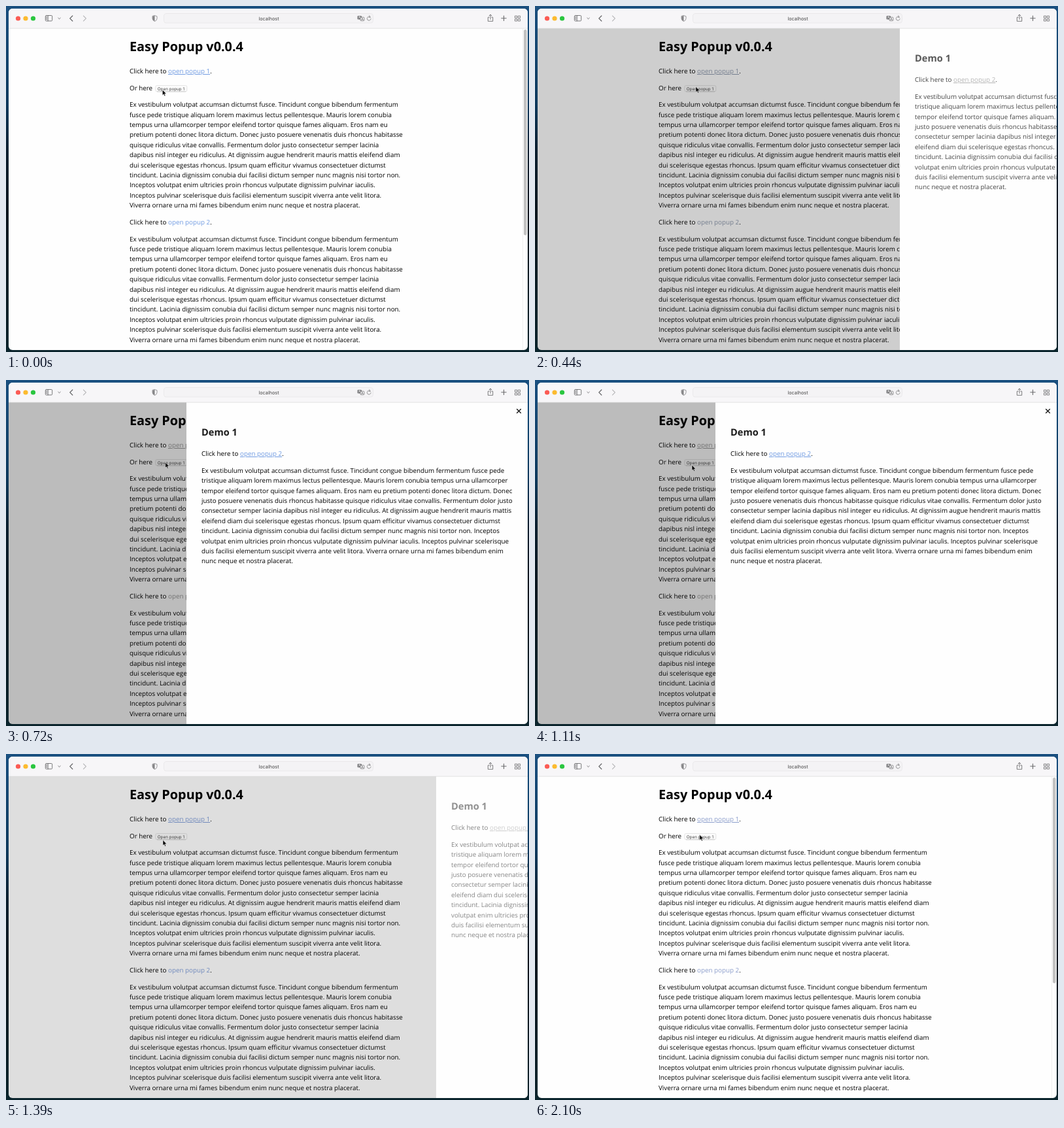
An HTML page that plays this animation: 800x529 px, repeating every 2.21 s.

```html
<!DOCTYPE html>
<html lang="en">
<head>
<meta charset="utf-8">
<title>Easy Popup</title>
<style>
  html, body { margin: 0; width: 100%; height: 100%; overflow: hidden; background: #0a1f29; }
  svg { display: block; width: 800px; height: 529px; }
  text { font: 9.83px "Open Sans", "Noto Sans", sans-serif; fill: #000; text-rendering: geometricPrecision; }
  .title { font-size: 19.84px; font-weight: 700; }
  .subtitle { font-size: 14.6px; font-weight: 700; fill: #1c1c1c; }
  .ui { font-family: Inter, "Liberation Sans", sans-serif; fill: #444; }
  .under { text-decoration: underline; text-decoration-thickness: .6px; text-underline-offset: 1px; }
  .icon { fill: none; stroke: #6a6a6c; stroke-width: .9; stroke-linecap: round; stroke-linejoin: round; }
</style>
</head>
<body>
<svg viewBox="0 0 800 529">
  <defs>
    <linearGradient id="sky" x2="0" y2="1">
      <stop offset="0" stop-color="#1a5080"/>
      <stop offset=".28" stop-color="#0e3a5e"/>
      <stop offset=".42" stop-color="#0a2030"/>
      <stop offset=".6" stop-color="#08161e"/>
      <stop offset="1" stop-color="#0b252d"/>
    </linearGradient>
    <clipPath id="frame"><rect x="4" y="4" width="794" height="522" rx="6"/></clipPath>
    <clipPath id="view"><rect x="4" y="34" width="794" height="492"/></clipPath>
  </defs>
  <rect width="800" height="529" fill="url(#sky)"/>

  <g clip-path="url(#frame)">
    <rect x="4" y="4" width="794" height="522" fill="#fefefe"/>

    <!-- Page -->
    <g id="page">
      <text class="title" x="189" y="69">Easy Popup v0.0.4</text>
      <text x="189" y="103">Click here to <tspan class="link under">open popup 1</tspan>.</text>
      <text x="189" y="128.7">Or here</text>
      <rect x="228.8" y="121.6" width="48" height="9.2" rx="2" fill="#fcfcfc" stroke="#d4d4d4" stroke-width=".6"/>
      <path d="M231 130.9H275" stroke="#bbb" stroke-width=".7"/>
      <text class="ui" x="231.8" y="128.5" style="font-size:6.3px">Open popup 1</text>
      <text x="189" y="334">Click here to <tspan class="link">open popup 2</tspan>.</text>
    </g>
    <g id="scrollbar">
      <path d="M790.5 35V526" stroke="#ececec" stroke-width=".8"/>
      <rect x="792" y="36" width="4.6" height="314.5" rx="2.3" fill="#c2c2c2"/>
    </g>
    <rect id="shade" x="4" y="34" width="794" height="492"/>
    <path id="gutter" d="M789.7 35V526" stroke="#fff" stroke-width="1.2" opacity=".7"/>

    <!-- Popup -->
    <g clip-path="url(#view)">
      <g id="panel">
        <rect x="276" y="34" width="524" height="492" fill="#fefefe"/>
        <g id="content">
          <text class="subtitle" x="299" y="85">Demo 1</text>
          <text x="299" y="116">Click here to <tspan id="panelLink" class="under">open popup 2</tspan>.</text>
          <path d="M781.2 44.2l6.6 6.6m0-6.6l-6.6 6.6" stroke="#111" stroke-width="1.3"/>
        </g>
      </g>
    </g>

    <!-- Toolbar -->
    <rect x="4" y="4" width="794" height="30" fill="#f7f6f8"/>
    <path d="M4 34.2H798" stroke="#dedede" stroke-width=".8"/>
    <circle cx="18.5" cy="19" r="3.6" fill="#fb5b54"/>
    <circle cx="30" cy="19" r="3.6" fill="#fcbb2f"/>
    <circle cx="41.5" cy="19" r="3.6" fill="#2ac63f"/>
    <rect x="241.5" y="11.5" width="320" height="14.5" rx="3.5" fill="#f4f3f5" stroke="#e5e4e6" stroke-width=".7"/>
    <text class="ui" x="402" y="21.6" text-anchor="middle" style="font-size:7.3px">localhost</text>
    <g class="icon">
      <rect x="60.3" y="14.5" width="10.4" height="8.4" rx="1.4"/>
      <path d="M64.2 14.5v8.4M61.6 16.7h1.2M61.6 18.6h1.2M61.6 20.5h1.2"/>
      <path d="M79.8 18.2l1.7 1.6 1.7-1.6"/>
      <path d="M101.8 15l-4 4 4 4" stroke-width="1.2"/>
      <path d="M118.4 15l4 4-4 4" stroke="#bcbcbe" stroke-width="1.1"/>
      <path d="M227.5 14.6l3.5 1.2v3.4q0 2.8-3.5 4.3-3.5-1.5-3.5-4.3v-3.4z" stroke="#858587" stroke-width=".8"/>
      <path d="M227.5 14.8v8.4q-3.3-1.5-3.3-4v-3.3z" fill="#858587" stroke="none"/>
      <rect x="537.6" y="15" width="6.4" height="5.4" rx="1.2" fill="#77777a" stroke="none"/>
      <path d="M539.2 16.7h3M540.7 16v1M539.5 19l2.3-2.2" stroke="#fff" stroke-width=".6"/>
      <rect x="542" y="17.2" width="6" height="5.4" rx="1.2" fill="#f4f3f5" stroke-width=".7"/>
      <path d="M543.6 21.4l1.4-3 1.4 3M544.2 20.5h1.7" stroke-width=".6"/>
      <path d="M557.7 17.7a2.9 2.9 0 1 0 .4 2M555.5 14.6l1.6 1.6-1.7 1.4" stroke-width=".7"/>
      <path d="M739 17.3h-1.7v6h7.4v-6H743M741 20.3v-7M739 15l2-2 2 2"/>
      <path d="M757.8 18.8h7.4M761.5 15.1v7.4" stroke-width="1.1"/>
      <path d="M778.8 15.2h3v3h-3zM783.6 15.2h3v3h-3zM778.8 20h3v3h-3zM783.6 20h3v3h-3z" stroke-width=".8"/>
    </g>
  </g>

  <path id="cursor" d="M0 0V8.4l1.9-1.7 1.3 3 1.4-.6-1.3-2.9h2.6z" fill="#050505" stroke="#fff" stroke-width=".5"/>
</svg>

<script>
const LOOP = 2210, SLIDE = 522, CLOSE = 1225;
const $ = id => document.getElementById(id);
const links = document.querySelectorAll('.link');
const words = `Ex vestibulum volutpat accumsan dictumst fusce. Tincidunt congue bibendum fermentum
fusce pede tristique aliquam lorem maximus lectus pellentesque. Mauris lorem conubia
tempus urna ullamcorper tempor eleifend tortor quisque fames aliquam. Eros nam eu
pretium potenti donec litora dictum. Donec justo posuere venenatis duis rhoncus habitasse
quisque ridiculus vitae convallis. Fermentum dolor justo consectetur semper lacinia
dapibus nisl integer eu ridiculus. At dignissim augue hendrerit mauris mattis eleifend diam
dui scelerisque egestas rhoncus. Ipsum quam efficitur vivamus consectetuer dictumst
tincidunt. Lacinia dignissim conubia dui facilisi dictum semper nunc magnis nisi tortor non.
Inceptos volutpat enim ultricies proin rhoncus vulputate dignissim pulvinar iaculis.
Inceptos pulvinar scelerisque duis facilisi elementum suscipit viverra ante velit litora.
Viverra ornare urna mi fames bibendum enim nunc neque et nostra placerat.`.split(/\s+/);

// Words per line at the two column widths
const pageWrap = [10, 11, 12, 12, 10, 13, 10, 13, 10, 11, 12];
const panelWrap = [12, 12, 15, 13, 14, 12, 14, 12, 15, 5];

function paragraph(parent, x, y, wrap) {
  let start = 0;
  wrap.forEach((count, row) => {
    const line = document.createElementNS('http://www.w3.org/2000/svg', 'text');
    line.setAttribute('x', x);
    line.setAttribute('y', y + row * 15.4);
    line.textContent = words.slice(start, start += count).join(' ');
    parent.append(line);
  });
}
paragraph($('page'), 189, 154.2, pageWrap);
paragraph($('page'), 189, 359.6, pageWrap);
paragraph($('content'), 299, 141.8, panelWrap);

const clamp = v => Math.min(1, Math.max(0, v));
const mix = (a, b, k) => a + (b - a) * k;
const mixColor = (a, b, k) => `rgb(${a.map((v, i) => mix(v, b[i], k))})`;

// CSS "ease": cubic-bezier(.25, .1, .25, 1)
function ease(x) {
  let lo = 0, hi = 1;
  for (let i = 0; i < 20; i++) {
    const s = (lo + hi) / 2, r = 1 - s;
    if (.75 * s * r + s ** 3 < x) lo = s; else hi = s;
  }
  return .3 * lo * (1 - lo) ** 2 + 3 * lo * lo * (1 - lo) + lo ** 3;
}
const run = (t, start, length) => ease(clamp((t - start) / length));

// Pointer stops: time, x, y
const stops = [
  [0, 239.3, 128], [60, 239.3, 128], [200, 246, 123.3], [610, 246, 123.3],
  [900, 240, 130], [1110, 240, 130], [1230, 240, 131.5], [1400, 240, 131.5],
  [1600, 246.8, 130.8], [1720, 246.8, 130.8], [2100, 251.8, 123.3], [LOOP, 251.8, 123.3]
];
function pointer(t) {
  const i = stops.findIndex(s => s[0] > t);
  const a = stops[i - 1], b = stops[i], k = (t - a[0]) / (b[0] - a[0]);
  return [mix(a[1], b[1], k), mix(a[2], b[2], k)];
}

const blue = [112, 155, 226], faded = [139, 157, 203], gray = [154, 154, 154];

function draw(t) {
  const closing = t >= CLOSE;
  const dim = closing ? 1 - run(t, CLOSE + 13, 500) : run(t, 225, 500);
  const open = closing ? 1 - run(t, CLOSE, 380) : run(t, 337, 380);
  const idle = t < 220 || t >= 1600;

  $('shade').setAttribute('opacity', .262 * dim);
  $('panel').setAttribute('transform', `translate(${SLIDE * (1 - open)})`);
  $('panel').style.display = open > .002 ? '' : 'none';
  $('content').setAttribute('opacity', dim);
  $('scrollbar').style.display = idle ? '' : 'none';
  $('gutter').style.display = idle ? 'none' : '';
  $('cursor').setAttribute('transform', `translate(${pointer(t)})`);

  const tint = closing ? mixColor(faded, blue, dim) : mixColor(blue, gray, dim);
  links.forEach(link => link.style.fill = tint);
  $('panelLink').style.fill = mixColor(gray, blue, closing ? 0 : clamp((t - 560) / 150));
}

function tick() {
  draw(performance.now() % LOOP);
  requestAnimationFrame(tick);
}
tick();
</script>
</body>
</html>
```
